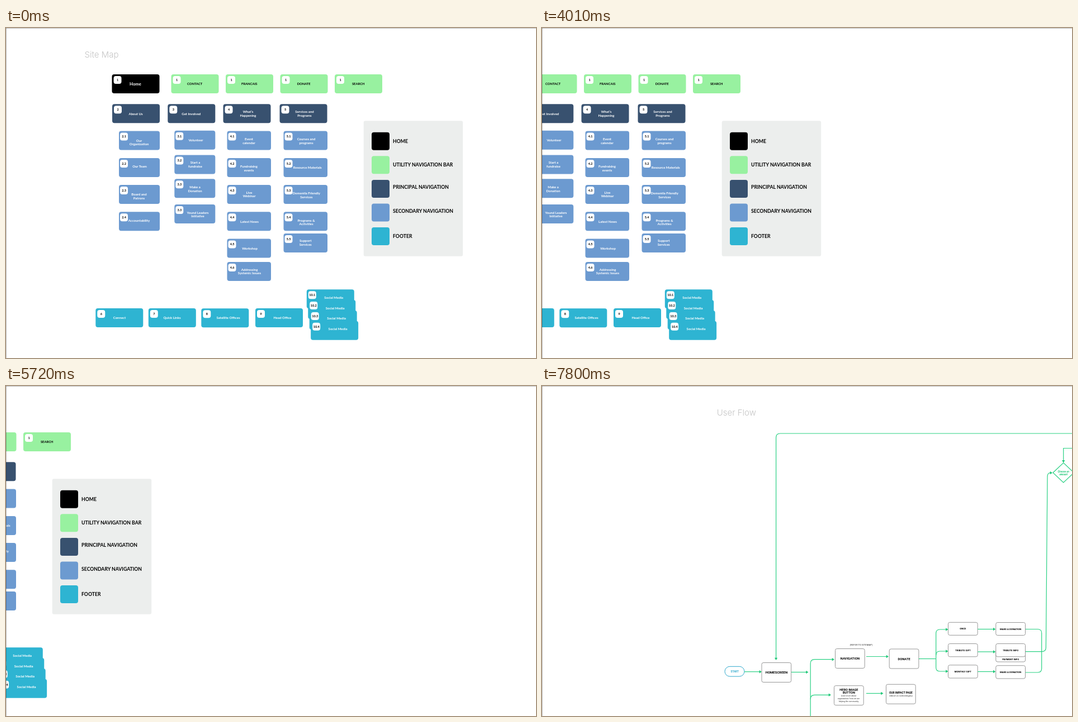
Animation, 948 px wide and 591 px high, one loop 8 s. Source, as an HTML page:

```html
<!DOCTYPE html>
<html lang="en">
<head>
<meta charset="utf-8">
<title>Site Map</title>
<style>
html, body { margin: 0; width: 100%; height: 100%; overflow: hidden; background: #fff; }
svg { position: absolute; left: 0; top: 0; display: block; }
text { font-family: Lato, sans-serif; font-weight: 700; text-anchor: middle; }
.title { font-family: Inter, sans-serif; font-weight: 300; fill: #c4c4c4; text-anchor: start; }
.legend { text-anchor: start; }
.flow text { font-family: Roboto, sans-serif; }
.flow .title { font-family: Inter, sans-serif; }
.flow .thin { font-weight: 400; fill: #333; }
.line { fill: none; stroke: #2bd184; stroke-width: 1.2; }
.card { fill: #fff; stroke: #8d8d8d; stroke-width: .9; }
#board { animation: pan 8s -8ms step-end infinite; }
#hint { fill: none; stroke: #e6e6e6; animation: hint 8s -8ms step-end infinite; }

/* wheel ticks of 39.8px */
@keyframes pan {
  0% { transform: translateX(0); }
  38.5% { transform: translateX(-199px); }
  41.875% { transform: translateX(-239px); }
  50.125% { transform: translateX(-318px); }
  55.5% { transform: translateX(-358px); }
  56.375% { transform: translateX(-398px); }
  61.375% { transform: translateX(-438px); }
  68.125% { transform: translateX(-478px); }
  69.875% { transform: translateX(-517px); }
  71% { transform: translateX(-557px); }
  72.125% { transform: translateX(-637px); }
  73.375% { transform: translateX(-677px); }
  74.5% { transform: translateX(-756px); }
  75.625% { transform: translateX(-796px); }
  76.75% { transform: translateX(-836px); }
  85.625% { transform: translateX(-876px); }
  88.875% { transform: translateX(-915px); }
  91.375% { transform: translateX(-955px); }
  92.375% { transform: translateX(-995px); }
  93.375% { transform: translateX(-1075px); }
  94.375% { transform: translateX(-1114px); }
  95.5% { transform: translateX(-1194px); }
  96.5% { transform: translateX(-1234px); }
  97.5%, 100% { transform: translateX(-1274px); }
}
@keyframes hint {
  0% { opacity: 0; }
  5.75% { opacity: .1; }
  6.625% { opacity: .2; }
  7.5% { opacity: .3; }
  10% { opacity: .5; }
  10.875% { opacity: .75; }
  11.75% { opacity: 1; }
  38.5%, 100% { opacity: 0; }
}
</style>
</head>
<body>
<svg width="948" height="591" viewBox="0 0 948 591">
  <g id="board">
    <g id="map"></g>
    <g id="flow" class="flow" transform="translate(1274 0)"></g>
  </g>
  <rect id="hint" x="833.5" y="582.5" width="56" height="14"/>
  <path d="M0 .5H948M.5 0V591" stroke="#000" stroke-opacity=".26" fill="none"/>
</svg>
<script>
const NS = 'http://www.w3.org/2000/svg';
const BLACK = '#000', GREEN = '#98f1a0', NAVY = '#38516f', BLUE = '#6c9ad0', TEAL = '#2eb4d2';
let layer;

function add(tag, attrs, content) {
  const el = document.createElementNS(NS, tag);
  for (const key in attrs) el.setAttribute(key, attrs[key]);
  if (content) el.textContent = content;
  layer.append(el);
}

function rect(x, y, width, height, rx, attrs) {
  add('rect', { x, y, width, height, rx, ...attrs });
}

// Lines split by | are centred on y
function label(x, y, str, size, fill = '#000', cls = '', gap = 6.6) {
  const lines = str.split('|');
  lines.forEach((s, i) => add('text', {
    x, y: y + (i - (lines.length - 1) / 2) * gap + size * .36,
    'font-size': size, fill, class: cls
  }, s));
}

function box(x, y, w, fill, num, str, tx, ty, size = 6, ink = '#fff') {
  const cx = x + (w > 80 ? 10 : 9), cy = y + 10;
  rect(x, y, w, 34, 4, { fill });
  rect(cx - 7, cy - 7, 14, 14, 4, { fill: '#fff' });
  label(cx, cy, num, 5.5);
  label(tx, ty, str, size, ink);
}

// Items: [y, text, text x, text y]
function column(x, w, n, items) {
  items.forEach(([y, str, tx, ty], i) =>
    box(x, y, w, BLUE, n === 3 && i === 3 ? '3.3' : n + '.' + (i + 1), str, tx, ty));
}

function drawMap() {
  add('text', { x: 140.5, y: 53, 'font-size': 15, class: 'title' }, 'Site Map');

  box(189.5, 83, 85, BLACK, '1', 'Home', 231.5, 100.5, 7.7);
  ['CONTACT', 'FRANCAIS', 'DONATE', 'SEARCH'].forEach((s, i) =>
    box(295.5 + i * 97.5, 83, 85, GREEN, '1', s, 337.7 + i * 97.5, 100, 5.8, '#000'));

  box(190, 136.3, 85, NAVY, '2', 'About Us', 232, 153.5);
  box(289.3, 136.3, 85, NAVY, '3', 'Get Involved', 331.3, 153.5);
  box(388.5, 136.3, 85, NAVY, '4', 'What’s|Happening', 433, 153.3);
  box(489.5, 136.3, 85, NAVY, '5', 'Services and|Programs', 534, 153.3);

  column(202, 73, 2, [
    [184.5, 'Our|Organization', 238, 205],
    [233, 'Our Team', 239, 248],
    [281, 'Board and|Patrons', 238, 301.3],
    [329.3, 'Accountability', 238, 344.5]]);
  column(301.3, 73, 3, [
    [183.7, 'Volunteer', 339.5, 201],
    [227.5, 'Start a|fundraise', 338.5, 244.5],
    [270.3, 'Make a|Donation', 338, 288.3],
    [316, 'Yound Leaders|Initiative', 343, 334]]);
  column(395.5, 78.5, 4, [
    [184.5, 'Event|calendar', 434.5, 202.3],
    [233, 'Fundraising|events', 434.5, 251.3],
    [281, 'Live|Webinar', 435, 298],
    [329.3, 'Latest News', 435.5, 346.5],
    [377.5, 'Workshop', 436, 394.7],
    [419, 'Addressing|Systemic Issues', 435.5, 435.8]]);
  column(496.5, 78.5, 5, [
    [184.5, 'Courses and|programs', 537, 202.5],
    [233, 'Resource Materials', 539.3, 249.5],
    [281, 'Dementia Friendly|Services', 537.3, 299.2],
    [329.3, 'Programs &|Activities', 537, 348],
    [368, 'Support|Services', 535.7, 384.3]]);

  box(160.3, 502, 85, TEAL, '6', 'Connect', 203, 519);
  box(254.8, 502, 85, TEAL, '7', 'Quick Links', 297, 519);
  box(349.3, 502.3, 85, TEAL, '8', 'Satellite Offices', 397.5, 519);
  box(446, 502, 85, TEAL, '9', 'Head Office', 494.5, 518.7);
  for (let i = 0; i < 4; i++)
    box(537.8 + i * 2.45, 468.3 + i * 18.8, 85, TEAL, '10.' + (i + 1),
      'Social Media', 586.2 + i * 2.45, 482.7 + i * 18.8);

  rect(639.7, 166.3, 177.5, 242.5, 3, { fill: '#eceeed' });
  [[BLACK, 'HOME', 202.5], [GREEN, 'UTILITY NAVIGATION BAR', 245],
   [NAVY, 'PRINCIPAL NAVIGATION', 285], [BLUE, 'SECONDARY NAVIGATION', 327.5],
   [TEAL, 'FOOTER', 373]].forEach(([fill, str, y], i) => {
    rect(654, 186.8 + i * 42.55, 32, 32, 4, { fill });
    label(692, y, str, 8.7, '#000', 'legend');
  });
}

// Path with an arrowhead whose tip is at x, y
function arrow(d, x, y, down) {
  add('path', { d, class: 'line' });
  add('path', {
    d: down ? `M${x} ${y}l-2.7 -4.3h5.4z` : `M${x} ${y}l-4.3 -2.7v5.4z`,
    fill: '#1fc777'
  });
}

function straight(x1, x2, y) {
  arrow(`M${x1} ${y}H${x2 - 3}`, x2, y);
}

function card(x, y, h, str, size, ty = y + h / 2) {
  rect(x, y, 52.7, h, 3, { class: 'card' });
  label(x + 26.4, ty, str, size, '#000', '', 5);
}

function drawFlow() {
  add('text', { x: 312.7, y: 53, 'font-size': 15, class: 'title' }, 'User Flow');

  arrow('M1000 85H426Q418.6 85 418.6 92.5V488', 418.6, 491, true);
  rect(327, 502.3, 35, 17.8, 8.9, { fill: '#fff', stroke: '#2fa8cc' });
  label(344.7, 511.5, 'START', 4.6, '#2fa8cc');
  straight(362, 393, 511.7);
  card(393, 495.5, 35, 'HOMESCREEN', 6);
  straight(446, 476.5, 512.5);

  arrow('M480.2 600V497Q480.2 489.7 487.5 489.7H520', 523, 489.7);
  arrow('M480.2 561Q480.2 553.3 487.5 553.3H514', 517, 553.3);
  label(571, 463.7, '(REFER TO SITEMAP)', 4.3, '#555', 'thin');
  card(524.5, 470.5, 35, 'NAVIGATION', 5.8);
  straight(580, 620, 484.5);
  card(621.2, 471, 35, 'DONATE', 5.8);

  card(522.5, 536.7, 35, 'HERO IMAGE|BUTTON', 5.6, 546.5);
  label(548.5, 559.6, 'Learn more about|organization/ how we are|helping the community', 3.5, '#333', 'thin', 4.8);
  straight(580, 610.5, 550.5);
  card(615.5, 534.3, 35, 'OUR IMPACT PAGE', 4.9, 549);
  label(642, 554.5, 'about us subcategory', 4.3, '#333', 'thin');

  add('path', { d: 'M674 488.5H704.7', class: 'line' });
  arrow('M704.7 488.5V443Q704.7 436 711.7 436H723', 726.5, 436);
  arrow('M704.7 482Q704.7 475 711.7 475H723', 726.5, 475);
  arrow('M704.7 488.5V504Q704.7 511 711.7 511H723', 726.5, 511);
  card(726.5, 423.3, 23, 'ONCE', 4.3);
  card(726.5, 461.5, 23.3, 'TRIBUTE GIFT', 4.3);
  card(726.5, 499.8, 23.3, 'MONTHLY GIFT', 4.3);
  straight(779.5, 811.3, 435.5);
  straight(779.5, 811.3, 476);
  straight(779.5, 811.3, 511.5);

  add('path', { d: 'M864.5 435.5H886.5Q893.7 435.5 893.7 442.5V506Q893.7 513 886.5 513H864.5', class: 'line' });
  arrow('M864.5 475.7H894Q901.3 475.7 901.4 468.5L904 163Q904 155.5 909 155.5', 913, 155.5);
  card(811.8, 471, 23, 'PAYMENT INFO', 4.3, 489.5);
  card(811.8, 423.5, 23, 'MAKE A DONATION', 4.3);
  card(811.8, 461.5, 23.3, 'TRIBUTE INFO', 4.3);
  card(811.8, 500.7, 23.3, 'MAKE A DONATION', 4.3);

  arrow('M1000 111.5H932.7V134', 932.7, 137.3, true);
  add('path', { d: 'M914 155.2L932.7 137.5L951.4 155.2L932.7 173Z', class: 'line' });
  add('text', { x: 932.7, y: 154.5, 'font-size': 4.4, fill: '#1fc777', 'font-style': 'italic' }, 'Choose an');
  add('text', { x: 932.7, y: 159.5, 'font-size': 4.4, fill: '#1fc777', 'font-style': 'italic' }, 'amount');
}

layer = document.getElementById('map');
drawMap();
layer = document.getElementById('flow');
drawFlow();
</script>
</body>
</html>
```
